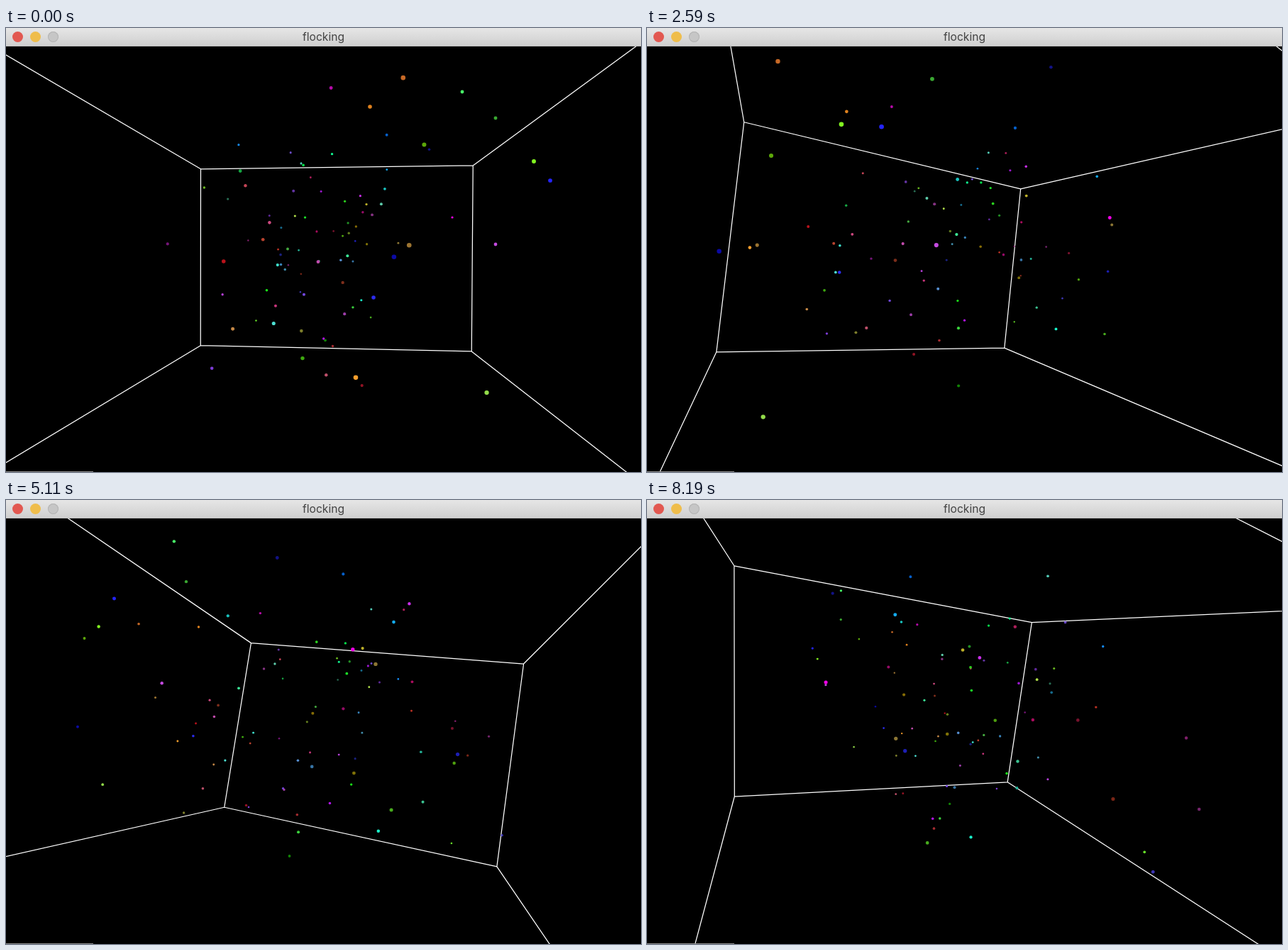
An HTML page with a canvas that plays this animation: 895 by 626 pixels, repeating every 8260 ms.

```html
<!DOCTYPE html>
<html lang="en">
<head>
<meta charset="utf-8">
<title>flocking</title>
<style>
  html, body { margin: 0; width: 100%; height: 100%; overflow: hidden; background: #000; }
  .bar {
    position: absolute; left: 0; top: 0; width: 895px; height: 26px; box-sizing: border-box;
    background: linear-gradient(#e6e6e6, #cfcfcf); border-bottom: 1px solid #bcbcbc;
    font: 15.6px/26px Inter, Roboto, sans-serif; color: #424242; text-align: center;
  }
  .bar i { position: absolute; top: 5px; width: 15px; height: 15px; border-radius: 50%; }
  canvas { position: absolute; left: 0; top: 26px; }
  .foot { position: absolute; left: 0; top: 625px; width: 123px; height: 1px; background: #8c8c8c; }
</style>
</head>
<body>
<div class="bar">
  <i style="left:8.5px;background:#e25850"></i>
  <i style="left:33.5px;background:#efbd4b"></i>
  <i style="left:58.5px;background:#c6c6c6;box-shadow:inset 0 0 0 1px #b4b4b4"></i>
  flocking
</div>
<canvas id="view" width="895" height="600"></canvas>
<div class="foot"></div>
<script>
const ctx = document.getElementById('view').getContext('2d');
const STEP = 70, STEPS = 118;
const CX = 447.5, CY = 300, FOCAL = 519.6, DIST = 515, NEAR = 30;
const HALF = [300, 200, 300];
const COUNT = 82;

// Camera drag: time in ms, yaw in degrees, x and z of the box's vertical axis.
const poses = [
  [0, 4, -.004, .009],
  [1540, 43.4, -.075, .023],
  [2590, 61.7, -.1045, -.023],
  [4340, 92, -.138, -.019],
  [5810, 116.9, -.16, -.045],
  [7140, 133.65, -.161, .071],
  [8190, 152.9, -.121, .196]
];

let seed = 77;
const rand = () => (seed = (seed * 16807) % 2147483647) / 2147483647;
const spread = r => (rand() + rand() - 1) * r;

// Smooth curve through the poses for one column.
function track(col, t) {
  let i = 0;
  while (i < poses.length - 2 && t > poses[i + 1][0]) i++;
  const slope = (a, b) => (poses[b][col] - poses[a][col]) / (poses[b][0] - poses[a][0]);
  const tangent = k => slope(Math.max(k - 1, 0), Math.min(k + 1, poses.length - 1));
  const p = poses[i], q = poses[i + 1], h = q[0] - p[0], u = (t - p[0]) / h, w = 1 - u;
  return w * w * (1 + 2 * u) * p[col] + u * u * (3 - 2 * u) * q[col]
    + h * u * w * (w * tangent(i) - u * tangent(i + 1));
}

function unit(v) {
  const n = Math.hypot(...v);
  return v.map(c => c / n);
}
const dot = (p, q) => p[0] * q[0] + p[1] * q[1] + p[2] * q[2];

// Box axes in camera space: x right, y down, z away.
function axesAt(t) {
  const yaw = track(1, t) * Math.PI / 180, vx = track(2, t), vz = track(3, t);
  const v = [vx, Math.sqrt(1 - vx * vx - vz * vz), vz];
  const c = Math.cos(yaw), s = Math.sin(yaw);
  const a = unit([c, (s * vz - c * vx) / v[1], -s]);
  const d = [a[1] * v[2] - a[2] * v[1], a[2] * v[0] - a[0] * v[2], a[0] * v[1] - a[1] * v[0]];
  return [a, v, d];
}

const toCamera = (p, [a, v, d]) =>
  [0, 1, 2].map(k => p[0] * a[k] + p[1] * v[k] + p[2] * d[k] + (k === 2 ? DIST : 0));
const project = p => [CX + p[0] * FOCAL / p[2], CY + p[1] * FOCAL / p[2]];

const boids = [];
// reach scales how far the boid wanders from home.
function addBoid(home, color, reach) {
  const sway = [34, 26, 26].map(r => ({
    amp: r * reach * (.5 + rand()), rate: .3 + rand() * .5, phase: rand() * 6.28
  }));
  boids.push({ home, sway, color });
}

// The nearest boids, by stage position and depth at the start.
const startAxes = axesAt(0);
function addNear(x, y, z, color) {
  const seen = [(x - CX) * z / FOCAL, (y - 26 - CY) * z / FOCAL, z - DIST];
  addBoid(startAxes.map(axis => dot(axis, seen)), color, .4);
}
addNear(744, 188, 304, '#82f520');
addNear(767, 215, 314, '#2424ff');
addNear(513, 111, 322, '#e0821e');
addNear(643, 90, 367, '#48f568');
addNear(690, 127, 363, '#3aa832');
addNear(690, 305, 377, '#c44ae0');
addNear(518, 380, 324, '#2c2cf0');
addNear(629, 267, 557, '#f000e6');

// The rest form a cloud stretched along the depth of the box.
for (let i = 0; i < COUNT; i++) {
  const color = `hsl(${rand() * 360} ${45 + rand() * 50}% ${26 + rand() * 34}%)`;
  addBoid([spread(190), spread(190) - 25, spread(290)], color, 1);
}

const boidAt = (b, s) => b.home.map((h, k) => {
  const { amp, rate, phase } = b.sway[k];
  return h + amp * (Math.sin(rate * s + phase) - Math.sin(phase));
});

const corner = n => HALF.map((h, k) => n >> k & 1 ? h : -h);

function drawEdge(p, q) {
  if (p[2] < NEAR && q[2] < NEAR) return;
  if (p[2] > q[2]) [p, q] = [q, p];
  if (p[2] < NEAR) {
    const u = (NEAR - p[2]) / (q[2] - p[2]);
    p = p.map((c, k) => c + (q[k] - c) * u);
  }
  ctx.moveTo(...project(p));
  ctx.lineTo(...project(q));
}

function draw(t) {
  const axes = axesAt(t);
  ctx.fillStyle = '#000';
  ctx.fillRect(0, 0, 895, 600);

  ctx.strokeStyle = '#fff';
  ctx.lineWidth = 1.25;
  ctx.beginPath();
  for (let n = 0; n < 8; n++) {
    for (const bit of [1, 2, 4]) {
      if (!(n & bit)) drawEdge(toCamera(corner(n), axes), toCamera(corner(n | bit), axes));
    }
  }
  ctx.stroke();

  const seen = boids.map(b => ({ color: b.color, p: toCamera(boidAt(b, t / 1000), axes) }));
  seen.sort((m, n) => n.p[2] - m.p[2]);
  for (const { color, p } of seen) {
    if (p[2] < NEAR) continue;
    ctx.fillStyle = color;
    ctx.beginPath();
    ctx.arc(...project(p), Math.min(900 / p[2], 3.3), 0, 7);
    ctx.fill();
  }
}

const begun = performance.now();
function tick() {
  const step = Math.floor((performance.now() - begun) / STEP) % STEPS;
  draw(step * STEP);
  requestAnimationFrame(tick);
}
tick();
</script>
</body>
</html>
```
